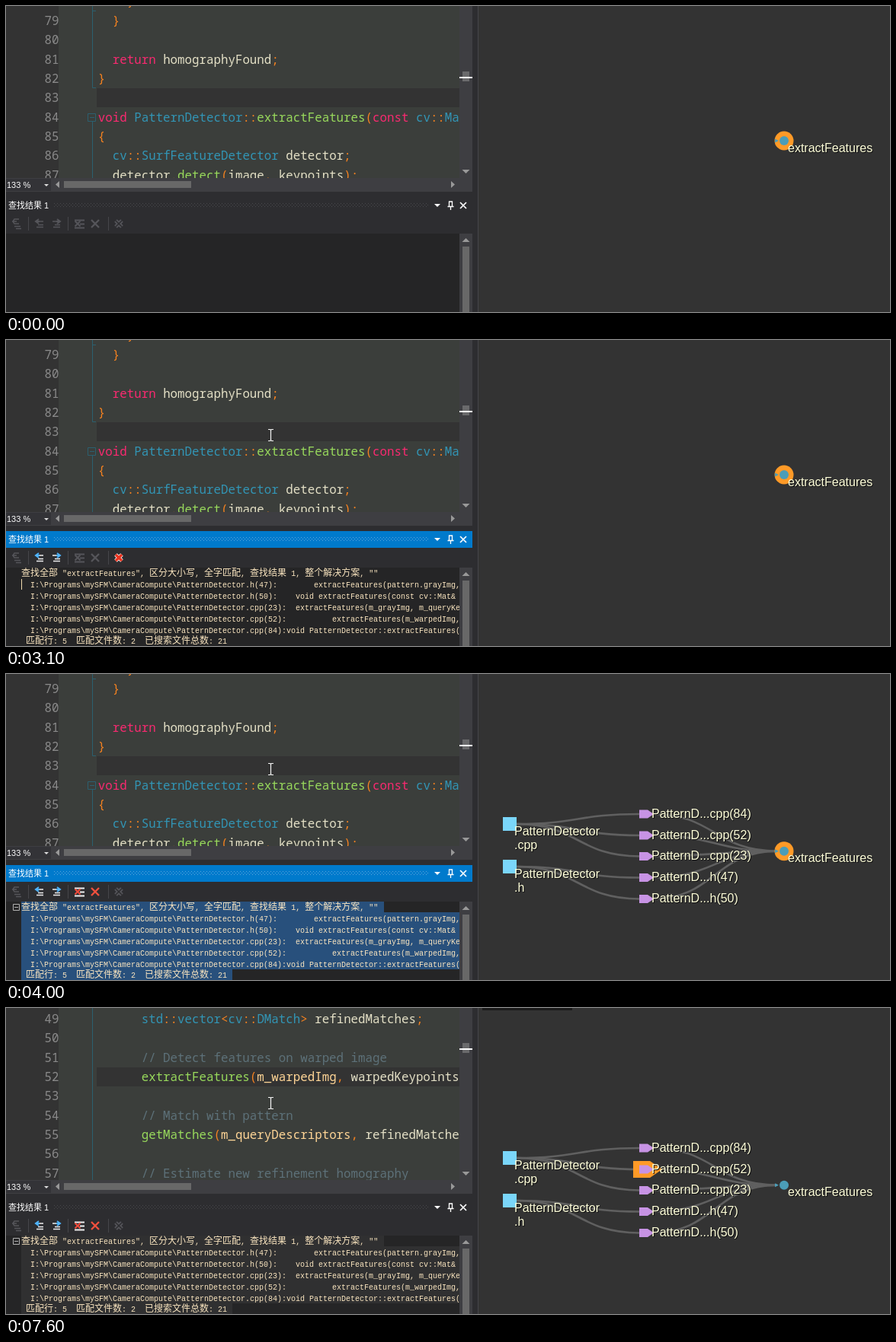
Write an HTML page that moves like this. It is 1160 px wide and 402 px high and loops after 8 s.

```html
<!DOCTYPE html>
<html lang="zh">
<head>
<meta charset="utf-8">
<style>
html, body { margin: 0; width: 100%; height: 100%; overflow: hidden; background: #333; }
svg { display: block; width: 1160px; height: 402px; }
text { white-space: pre; }
.code { font: 15.8px "Noto Sans Mono", "DejaVu Sans Mono", monospace; }
.row { font: 10px "Liberation Mono", monospace; fill: #fbe6c0; }
.row .han { font: 12px "Noto Sans CJK SC", "Noto Sans CJK", sans-serif; }
.ui { font: 11px "Liberation Sans", "Noto Sans CJK SC", "Noto Sans CJK", sans-serif; fill: #fff; }
.label { font: 16px "Liberation Sans", sans-serif; }
</style>
</head>
<body>
<svg id="stage" viewBox="0 0 1160 402"></svg>
<script>
const LOOP = 8000, STEP = 100;
const stage = document.getElementById('stage');
const ORANGE = '#ff9a27';

const rect = (x, y, w, h, fill) => `<rect x="${x}" y="${y}" width="${w}" height="${h}" fill="${fill}"/>`;
const fillPath = (d, fill) => `<path d="${d}" fill="${fill}"/>`;
const line = (d, stroke, width = 1) => `<path d="${d}" fill="none" stroke="${stroke}" stroke-width="${width}"/>`;
const text = (x, y, cls, body, fill) =>
  `<text x="${x}" y="${y}" class="${cls}"${fill ? ` fill="${fill}"` : ''}>${body}</text>`;
const escape = s => s.replace(/&/g, '&amp;').replace(/</g, '&lt;').replace(/>/g, '&gt;');

// ---------- editor ----------
const LINE_H = 25.33;
const views = [
  { first: 78, base: -0.3, current: 83, markY: 94, caretX: 120, lines: [
    '    }', '  }', '', '  return homographyFound;', '}', '',
    'void PatternDetector::extractFeatures(const cv::Mat& image', '{',
    '  cv::SurfFeatureDetector detector;', '  detector.detect(image, keypoints);'] },
  { first: 20, base: 20, current: 23, markY: 15, caretX: 120, lines: [
    '  cv::cvtColor(image, m_grayImg, cv::COLOR_BGR2GRAY);', '',
    '  // Extract feature points from input gray image',
    '  extractFeatures(m_grayImg, m_queryKeypoints, m_queryDescriptors);', '',
    '  // Get matches with current pattern',
    '  getMatches(m_queryDescriptors, m_matches);', '',
    '  // Find homography transformation and detect good matches'] },
  { first: 49, base: 20, current: 52, markY: 54, caretX: 139, lines: [
    '      std::vector<cv::DMatch> refinedMatches;', '',
    '      // Detect features on warped image',
    '      extractFeatures(m_warpedImg, warpedKeypoints, m_queryDescriptors);', '',
    '      // Match with pattern',
    '      getMatches(m_queryDescriptors, refinedMatches);', '',
    '      // Estimate new refinement homography'] }
];

const tokenColors = [
  [/^\/\//, '#5d7179'],
  [/^(void|return|const)$/, '#f92a70'],
  [/^(cv|std|vector|Mat|DMatch|PatternDetector|SurfFeatureDetector)$/, '#3295b5'],
  [/^m_/, '#ffd596'],
  [/^[A-Z][A-Z0-9_]+$/, '#a09cff'],
  [/^\w+(?=\()/, '#98d95c'],
  [/^\w/, '#e4e0c6'],
  [/^\S/, '#f58220']
];

function highlight(src) {
  return src.replace(/\/\/.*|\w+|[^\w\s]+/g, (tok, at) => {
    const call = /^\w+$/.test(tok) && src[at + tok.length] === '(' ? '(' : '';
    const color = tokenColors.find(([re]) => re.test(tok + call))[1];
    return `<tspan fill="${color}">${escape(tok)}</tspan>`;
  });
}

function editor(view, caret) {
  const top = Math.round(view.base + (view.current - view.first) * LINE_H - 18);
  let out = rect(0, 0, 69, 226, '#333') + rect(69, 0, 526, 226, '#3b3e3b') + rect(119, top, 476, 25, '#333');
  const guide = view === views[0]
    ? 'M113.5 0V107.5H118M113.5 6.5H118M113.5 152V226M107.5 141.5h10v10h-10zM110 146.5h6'
    : 'M113.5 0V226';
  out += line(guide, '#2b6070');
  view.lines.forEach((src, i) => {
    const y = view.base + i * LINE_H;
    out += text(50.5, y, 'code', view.first + i, '#8a8a8a') + text(120.8, y, 'code', highlight(src));
  });
  if (caret) out += rect(view.caretX + .5, top, 1.4, 24, '#e8e8e8');
  return `<g clip-path="url(#editor)">${out}</g>`
    + rect(595, 0, 17, 226, '#3e3e42') + rect(599, view.markY - 8, 9, 13, '#6a6a6c')
    + rect(595, view.markY - 1, 17, 2, '#fff') + fillPath('M598.500 215h10l-5 5z', '#999');
}

function statusBar() {
  return rect(0, 226, 612, 18, '#3e3e42') + rect(0, 227, 59, 16, '#333337')
    + text(1, 239, 'ui', '133 %') + fillPath('M50 234h6l-3 3z', '#ddd')
    + fillPath('M70 230v9l-5-4.500z', '#999') + rect(76, 230, 167, 9, '#686868')
    + fillPath('M584 230v9l5-4.500z', '#999');
}

// ---------- find results ----------
const path = 'I:\\Programs\\mySFM\\CameraCompute\\PatternDetector.';
const rows = [
  '查找全部 "extractFeatures", 区分大小写, 全字匹配, 查找结果 1, 整个解决方案, ""',
  `  ${path}h(47):        extractFeatures(pattern.grayImg, pattern.keypoints`,
  `  ${path}h(50):    void extractFeatures(const cv::Mat& image`,
  `  ${path}cpp(23):  extractFeatures(m_grayImg, m_queryKeypoints`,
  `  ${path}cpp(52):          extractFeatures(m_warpedImg, warpedKeypoints`,
  `  ${path}cpp(84):void PatternDetector::extractFeatures(const`,
  ' 匹配行: 5  匹配文件数: 2  已搜索文件总数: 21'
];
const rowEnds = [496, 595, 595, 595, 595, 595, 297];
const withHan = s => escape(s).replace(/[\u4e00-\u9fff]+/g, '<tspan class="han">$&</tspan>');

function toolbar(ready, stop) {
  const off = '#55555a';
  const arrow = (x, dir, on) => {
    const blue = on ? '#4fb4ff' : off, pale = on ? '#eee' : off;
    return line(`M${x - 5 * dir} 283h${10 * dir}M${x - 2} 287.500h7M${x - 4} 290.500h9`, pale, 1.6)
      + line(dir < 0 ? `M${x - 1} 280l-4 3l4 3M${x - 5} 283h5` : `M${x + 1} 280l4 3l-4 3M${x + 5} 283h-5`, blue, 2);
  };
  const cross = (x, r, color, w) => line(`M${x - r} ${286 - r}l${2 * r} ${2 * r}M${x + r} ${286 - r}l${-2 * r} ${2 * r}`, color, w);
  return line('M29.500 277v18M81.500 277v18M134.500 277v18', '#46464a')
    + line('M17 280h-6l-2 3l2 3h6M8 283h6M11 289.500h8M13 292.500h7', off, 1.5)
    + arrow(44, -1, ready || stop) + arrow(66, 1, ready || stop)
    + line('M90 281.500h13M97 286.500h6M90 291.500h13', ready ? '#eee' : off, 2)
    + cross(94, 3.5, ready ? '#f04a3a' : off, 2)
    + cross(117, 5, ready ? '#f0503e' : off, 2.4)
    + cross(148, 4, stop ? '#fff' : off, 5) + cross(148, 4, stop ? '#e8321e' : '#2d2d30', stop ? 3.4 : 1.6);
}

function results(s) {
  let out = rect(0, 244, 612, 55, '#2d2d30') + rect(0, 251, 612, 22, s.panelActive ? '#007acc' : '#2d2d30')
    + text(3, 266, 'ui', '查找结果 1')
    + `<g fill="${s.panelActive ? '#59a8de' : '#48484c'}">`
    + '<rect x="63" y="259" width="491" height="6" fill="url(#grip)"/></g>'
    + fillPath('M562 260h8l-4 4z', '#fff')
    + line('M581.500 263v-6h4v6M579.500 263.500h8M583.500 264v4', '#fff', 1.3)
    + line('M596 258l8 8M604 258l-8 8', '#fff', 1.7)
    + toolbar(s.ready, s.stop) + rect(0, 299, 612, 103, '#252526');
  let body = '';
  for (let i = 0; i < s.rowCount; i++) {
    const y = i ? 299 + 15 * i - 1 : 299;
    if (s.selected > i) body += rect(20, y, rowEnds[i] - 20, 15, s.panelActive ? '#28507c' : '#303031');
    body += text(20, 310 + 14.9 * i, 'row', withHan(rows[i]));
  }
  if (s.rowCaret) body += rect(20, 314, 1, 14, '#f0d9ac');
  if (s.ready) body += line('M9.500 302.500h8v8h-8zM11 306.500h5', '#b0b0b0');
  return out + `<g clip-path="url(#results)">${body}</g>`
    + rect(595, 299, 17, 103, '#3e3e42') + fillPath('M598.500 310h10l-5-5z', '#999')
    + rect(599, 316, 9, 86, '#686868');
}

// ---------- graph ----------
const ROOT = { x: 1021, y: 177 };
const files = [
  { x: 661, y: 197, ext: '.cpp' },
  { x: 661, y: 253, ext: '.h' }
];
const hits = [
  { y: 184, name: 'cpp(84)', file: 0 }, { y: 212, name: 'cpp(52)', file: 0 },
  { y: 239.5, name: 'cpp(23)', file: 0 }, { y: 267.5, name: 'h(47)', file: 1 },
  { y: 295.5, name: 'h(50)', file: 1 }
];
const label = (x, y, str) => text(x + 1, y + 1, 'label', str, '#111') + text(x, y, 'label', str, '#ffffd9');
const pin = (x, y, k, fill) =>
  fillPath(`M${x - 8 * k} ${y - 5.5 * k}h${11 * k}l${8 * k} ${5.5 * k}l${-8 * k} ${5.5 * k}h${-11 * k}z`, fill);

function edge(x1, y1, x2, y2, color, width) {
  const mid = (x1 + x2) / 2;
  return line(`M${x1} ${y1}C${mid} ${y1} ${mid} ${y2} ${x2} ${y2}`, color, width);
}

function graph(s) {
  const spread = (x, y) => ({ x: x + (ROOT.x - x) * s.rest, y: y + (ROOT.y - y) * s.rest });
  const root = spread(1021, 232.7);
  let edges = '', shapes = '', labels = '';
  if (s.rest < 1) {
    const boxes = files.map(f => spread(f.x, f.y));
    const pins = hits.map(h => spread(839, h.y));
    const order = [0, 1, 3, 4, 2];
    for (const i of order) {
      const p = pins[i], b = boxes[hits[i].file];
      edges += edge(b.x + 9, b.y, p.x - 8, p.y, '#606060', 2.6);
      edges += s.edgesLit
        ? edge(p.x + 9, p.y, root.x - 13, root.y, i === 2 ? ORANGE : '#b07024', 7)
        : edge(p.x + 9, p.y, root.x - 9, root.y, '#606060', 2.6);
    }
    pins.forEach((p, i) => {
      if (s.litPin === i) shapes += pin(p.x, p.y, 2, ORANGE);
      shapes += pin(p.x, p.y, 1, '#c793e4');
      labels += label(p.x + 8, p.y + 4.5, 'PatternD...' + hits[i].name);
    });
    boxes.forEach((b, i) => {
      shapes += rect(b.x - 9, b.y - 9, 18, 18, '#7ad6fa');
      labels += label(b.x + 6, b.y + 15, 'PatternDetector') + label(b.x + 6, b.y + 33, files[i].ext);
    });
  }
  if (s.rootLit) shapes += `<circle cx="${root.x}" cy="${root.y}" r="12.500" fill="${ORANGE}"/>`;
  shapes += `<circle cx="${root.x}" cy="${root.y}" r="6" fill="#4b9db8"/>`
    + fillPath(`M${root.x - 12} ${root.y - 2.5}l5 2.500l-5 2.500z`, '#4b9db8');
  labels += label(root.x + 5, root.y + 14.7, 'extractFeatures');
  return rect(612, 0, 7, 402, '#2d2d30') + rect(619, 0, 1, 402, '#45454a') + rect(620, 0, 540, 402, '#333')
    + (s.topBar ? rect(625, 0, 118, 3, '#1a1a1a') : '') + edges + shapes + labels;
}

// ---------- pointer ----------
function pointer(t) {
  if (t < 100) return '';
  const u = Math.min(1, (t - 100) / 500), e = u * u * (3 - 2 * u);
  const x = Math.round(978 + (347 - 978) * e), y = Math.round(37 + (125 - 37) * e);
  if (x > 612) return `<path d="M${x} ${y}v16l4-3.500l3 6l2-1l-3-6h5z" fill="#fff" stroke="#000" stroke-width=".8"/>`;
  return line(`M${x - 3} ${y - 7.5}h2.500l1 1l1-1h2.500M${x - 3} ${y + 7.5}h2.500l1-1l1 1h2.500M${x + .5} ${y - 7}v14`, '#f4f4f4', 1.2);
}

// ---------- timeline ----------
const caretSpans = [[800, 1200], [1700, 2200], [4700, 5200], [5600, 6100], [6600, 7100], [7200, 7600]];
const within = (t, a, b) => t >= a && t < b;

function stateAt(t) {
  return {
    view: views[t < 4700 ? 0 : t < 7200 ? 1 : 2],
    caret: caretSpans.some(([a, b]) => within(t, a, b)),
    panelActive: within(t, 2500, 4700),
    rowCount: t < 2500 ? 0 : t < 2900 ? 1 : t < 3000 ? 4 : 7,
    selected: t < 2900 ? 1 : t < 3200 ? 0 : 7,
    rowCaret: within(t, 2500, 3200),
    stop: within(t, 2900, 3300),
    ready: t >= 3300,
    rest: t <= 3200 ? 1 : t < 4000 ? Math.pow(.5, (t - 3200) / 100) : 0,
    rootLit: t < 4700,
    edgesLit: within(t, 4700, 5800),
    litPin: t < 5800 ? -1 : t < 7100 ? 2 : 1,
    topBar: t >= 5800
  };
}

const defs = `<defs>
  <clipPath id="editor"><rect width="595" height="226"/></clipPath>
  <clipPath id="results"><rect y="299" width="595" height="103"/></clipPath>
  <pattern id="grip" x="63" y="259" width="4" height="4" patternUnits="userSpaceOnUse">`;
const gripDots = color => rect(0, 0, 1, 1, color) + rect(2, 2, 1, 1, color) + '</pattern></defs>';

function draw(t) {
  const s = stateAt(t);
  stage.innerHTML = defs + gripDots(s.panelActive ? '#59a8de' : '#48484c')
    + editor(s.view, s.caret) + statusBar() + results(s) + graph(s) + pointer(t);
}

let shown = -1;
const start = performance.now();
function tick() {
  const step = Math.floor(((performance.now() - start) % LOOP) / STEP);
  if (step !== shown) draw((shown = step) * STEP);
  requestAnimationFrame(tick);
}
tick();
</script>
</body>
</html>
```
